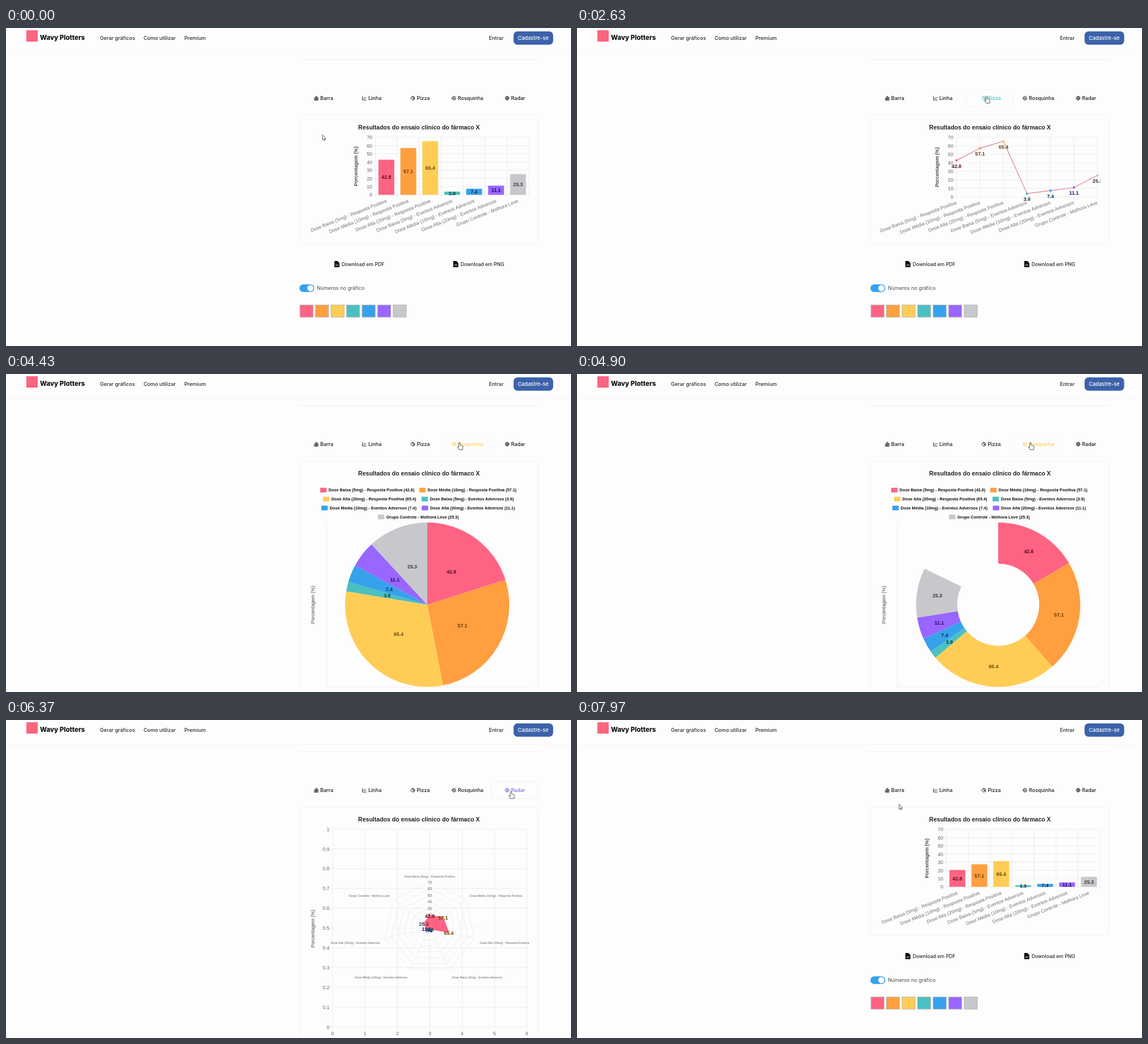
An HTML page that plays this animation: 998x561 px, repeating every 8000 ms.

```html
<!DOCTYPE html>
<html lang="pt-BR">
<head>
<meta charset="utf-8">
<title>Gráficos</title>
<style>
html, body { margin: 0; width: 100%; height: 100%; overflow: hidden; background: #fdfdfd; }
svg { display: block; width: 100%; height: 100%; }
text { white-space: pre; }
.ui { font-family: Inter, sans-serif; }
.chart { font-family: "Liberation Sans", Arial, sans-serif; }
</style>
</head>
<body>
<svg viewBox="0 0 998 561">
  <defs><clipPath id="edge"><rect x="518" y="150" width="406.5" height="411"/></clipPath></defs>
  <g id="page"></g>
  <g id="tabs"></g>
  <g id="plot"></g>
  <g id="cursor"></g>
</svg>
<script>
const LOOP = 8000;
const GROW = 1000;
const TITLE = "Resultados do ensaio clínico do fármaco X";
const AXIS = "Porcentagem (%)";
const NAMES = [
  "Dose Baixa (5mg) - Resposta Positiva", "Dose Média (10mg) - Resposta Positiva",
  "Dose Alta (20mg) - Resposta Positiva", "Dose Baixa (5mg) - Eventos Adversos",
  "Dose Média (10mg) - Eventos Adversos", "Dose Alta (20mg) - Eventos Adversos",
  "Grupo Controle - Melhora Leve"
];
const VALUES = [42.8, 57.1, 65.4, 3.9, 7.4, 11.1, 25.3];
const TOTAL = VALUES.reduce((a, b) => a + b);
const COLORS = ["#ff6384", "#ff9f40", "#ffcd56", "#4bc0c0", "#36a2eb", "#9966ff", "#c7c8cc"];
const DARK = ["#5c0a1c", "#6b3a05", "#6a4a08", "#0d3d3d", "#0c2a5c", "#200a5c", "#3c3c3c"];
const GRID = "#ebebf2";
const TAU = Math.PI * 2;

const el = id => document.getElementById(id);
const range = (n, f) => Array.from({ length: n }, (_, i) => f(i)).join("");

// y is the vertical middle of the text
function text(x, y, str, size, { cls = "chart", fill = "#666", weight = 400, anchor = "start", turn = 0 } = {}) {
  const spin = turn ? ` transform="rotate(${turn} ${x} ${y})"` : "";
  return `<text class="${cls}" x="${x}" y="${y + size * 0.36}" font-size="${size}" font-weight="${weight}" fill="${fill}" text-anchor="${anchor}"${spin}>${str}</text>`;
}
const ui = (x, y, str, size = 9, weight = 500, fill = "#2a2a2c") =>
  text(x, y, str, size, { cls: "ui", weight, fill });
const rect = (x, y, w, h, fill, extra = "") =>
  `<rect x="${x}" y="${y}" width="${w}" height="${h}" fill="${fill}" ${extra}/>`;
const line = (x1, y1, x2, y2, color = GRID, extra = "") =>
  `<path d="M${x1} ${y1}L${x2} ${y2}" stroke="${color}" stroke-width=".9" fill="none" ${extra}/>`;
const dot = (x, y, r, fill) => `<circle cx="${x}" cy="${y}" r="${r}" fill="${fill}"/>`;
const valueLabel = (x, y, i) =>
  text(x, y, VALUES[i], 8.8, { fill: DARK[i], weight: 700, anchor: "middle" });
const axisName = (x, y, weight) =>
  text(x, y, AXIS, 8.6, { fill: "#4a4a4a", weight, anchor: "middle", turn: -90 });

function drawPage() {
  const file = x => `<path d="M${x} 411h5.5l3.5 3.5v7.5h-9z" fill="#111"/>` + rect(x + 1.8, 417, 5.4, 2.4, "#777");
  el("page").innerHTML =
    rect(0, 0, 998, 561, "#fdfdfd") +
    line(0, 43.5, 998, 43.5, "#f5f5f2") +
    line(518, 55.5, 940, 55.5, "#ececea") +
    rect(36, 4, 20, 20, "#fb6580") +
    ui(60, 17, "Wavy Plotters", 11.5, 800, "#111") +
    ui(166, 17.5, "Gerar gráficos") + ui(243, 17.5, "Como utilizar") + ui(315, 17.5, "Premium") +
    ui(853, 17.5, "Entrar") +
    rect(896.5, 6, 70, 23.6, "#3c62a9", 'rx="7"') +
    ui(904, 17.5, "Cadastre-se", 9.2, 500, "#fff") +
    `<g id="tools">` +
    file(580) + ui(593, 416.5, "Download em PDF", 8.6) +
    file(790) + ui(803, 416.5, "Download em PNG", 8.6) +
    rect(518.2, 452.2, 26.4, 13.6, "#36a2eb", 'rx="6.8"') + dot(537.6, 459, 5.4, "#fff") +
    ui(549, 459, "Números no gráfico", 9, 400, "#4a4a4a") +
    range(7, i => rect(519.2 + i * 27.45, 488.7, 23.2, 21.4, COLORS[i], 'stroke="#bab6b4"')) +
    `</g>`;
}

// Tabs: label, text x, icon path, hover colour
const TABS = [
  ["Barra", 555, "M0 7.5h7.5M.6 7V3.6h2V7M2.8 7V.8h2V7M5 7V2.8h2V7", COLORS[0]],
  ["Linha", 640, "M.5 .5v6.8h7M2 5.2l1.8-1.9 1.2 1L7.2 2", COLORS[4]],
  ["Pizza", 725.5, "M4 .7a3.3 3.3 0 1 0 .01 0M4 .7V4l2.3 2.4M4 4h3.2", COLORS[3]],
  ["Rosquinha", 798, "M4 .7a3.3 3.3 0 1 0 .01 0M4 2.6a1.4 1.4 0 1 0 .01 0M5 5l1.3 1.3M2.7 4H.8", COLORS[2]],
  ["Radar", 892, "M4 .7a3.3 3.3 0 1 0 .01 0M4 .7v6.6M4 2.2a1.8 1.8 0 0 0 0 3.6M5 2.4h1.6M5 4h2M5 5.6h1.6", "#8a6fdc"]
];
const TAB_W = 84.4;

function tabAt(x, y) {
  return y > 108 && y < 139 && x > 518 && x < 940 ? Math.floor((x - 518) / TAB_W) : -1;
}

function drawTabs(hover) {
  el("tabs").innerHTML = TABS.map(([name, x, icon, color], i) => {
    const on = i === hover, ink = on ? color : "#1a1a1a";
    const frame = on ? rect(519.5 + i * TAB_W, 108.5, TAB_W - 2, 30, "#fdfdfd", `rx="5" stroke="${color}" stroke-opacity=".1"`) : "";
    return frame + `<path transform="translate(${x - 10.8} 119.8)" d="${icon}" fill="none" stroke="${ink}" stroke-width=".95"/>` +
      ui(x, 123.5, name, 9, 550, ink);
  }).join("");
}

function card(height) {
  return rect(518.5, 153.5, 421.5, height, "#fdfdfd", 'rx="5" stroke="#f1f1f0"') +
    text(729.5, 175.7, TITLE, 10.54, { fill: "#222", weight: 700, anchor: "middle" });
}

// Shared value axis, grid and slanted category names
function frame({ left, step, cols, top, base, first, tilt, nameY }) {
  const right = left + step * (cols - 1);
  const unit = (base - top) / 7;
  return range(8, k => {
    const y = base - k * unit;
    return line(left - 4, y, right, y) + text(left - 5.5, y, k * 10, 8.8, { anchor: "end" });
  }) +
  range(cols, i => line(left + i * step, top, left + i * step, base + 4)) +
  NAMES.map((name, i) => {
    const x = first + i * step;
    return `<text class="chart" font-size="8.5" fill="#707070" text-anchor="end" transform="translate(${x} ${nameY}) rotate(${-tilt})">${name}</text>`;
  }).join("");
}

function barChart(p) {
  const left = 652.5, step = 38.75, base = 294.3, top = 193;
  return card(226.5) + axisName(618.2, 244, 700) +
    frame({ left, step, cols: 8, top, base, first: 673, tilt: 21.5, nameY: 307.3 }) +
    VALUES.map((v, i) => {
      const h = v * p * (base - top) / 70, x = left + step * (i + 0.5);
      return rect(x - 14, base - h, 28, h, COLORS[i]) + valueLabel(x, base - h / 2, i);
    }).join("");
}

function lineChart(p) {
  const left = 670.3, step = 41.5, base = 298, top = 192.7;
  const pts = VALUES.map((v, i) => [left + step * i, base - v * p * (base - top) / 70]);
  return card(227) + axisName(636, 245.5, 700) +
    frame({ left, step, cols: 7, top, base, first: 671, tilt: 20.6, nameY: 310.3 }) +
    `<g clip-path="url(#edge)"><path d="M${pts.join("L")}" fill="none" stroke="#e0788f" stroke-width="1.15"/>` +
    pts.map(([x, y], i) => dot(x, y, 2.2, COLORS[i])).join("") +
    pts.map(([x, y], i) => valueLabel(x, y + 10, i)).join("") + `</g>`;
}

// Legend: swatch x, row
const LEGEND = [[555, 0], [730, 0], [560, 1], [734, 1], [557, 2], [734.5, 2], [657, 3]];

function roundChart(p, inner) {
  const cx = 744, cy = 407, R = 145;
  const at = (a, r) => `${cx + Math.sin(a) * r} ${cy - Math.cos(a) * r}`;
  const mid = (R + inner) / 2;
  let a = 0, slices = "", labels = "";
  VALUES.forEach((v, i) => {
    const b = a + v / TOTAL * TAU * p, m = (a + b) / 2;
    slices += `<path d="M${at(a, inner)}L${at(a, R)}A${R} ${R} 0 0 1 ${at(b, R)}L${at(b, inner)}` +
      `A${inner} ${inner} 0 0 0 ${at(a, inner)}Z" fill="${COLORS[i]}"/>`;
    labels += valueLabel(cx + Math.sin(m) * mid, cy - Math.cos(m) * mid, i);
    a = b;
  });
  const legend = LEGEND.map(([x, row], i) => {
    const y = 204.7 + row * 15.8;
    return rect(x, y - 4, 11.2, 8.2, COLORS[i]) +
      text(x + 14.7, y, `${NAMES[i]} (${VALUES[i]})`, 7.3, { fill: "#111", weight: 700 });
  }).join("");
  return card(450) + legend + axisName(541.5, 407, 400) +
    line(566, 262, 566, 552, "#dedef2", 'stroke-dasharray="2 1"') +
    line(566, 552, 922, 552, "#dedef2", 'stroke-dasharray="2 1"') + slices + labels;
}

// Radar captions: x, y, anchor
const CAPTIONS = [
  [748.5, 276, "middle"], [819, 310, "start"], [837, 393, "start"], [788, 454, "start"],
  [709, 454, "end"], [661, 393, "end"], [678, 310, "end"]
];

function radarChart(p) {
  const cx = 748.5, cy = 367, R = 81, left = 577, top = 192.5, dx = 57.2, dy = 34.9;
  const spoke = (i, r) => [cx + Math.sin(i * TAU / 7) * r, cy - Math.cos(i * TAU / 7) * r];
  const poly = f => "M" + VALUES.map((v, i) => spoke(i, f(v))).join("L") + "Z";
  const pts = VALUES.map((v, i) => spoke(i, v * p * R / 70));
  return card(450) + axisName(541.5, 368, 400) +
    range(11, k => {
      const y = top + k * dy;
      return line(left - 4, y, 920, y) + text(571.5, y, (10 - k) / 10, 8.8, { anchor: "end" });
    }) +
    range(7, k => {
      const x = left + k * dx;
      return line(x, top, x, top + 10 * dy + 4) + text(x, 552.5, k, 8.8, { anchor: "middle" });
    }) +
    range(7, k => `<path d="${poly(() => R * (k + 1) / 7)}" fill="none" stroke="${GRID}" stroke-width=".9"/>`) +
    range(7, i => line(cx, cy, ...spoke(i, R))) +
    range(7, k => {
      const y = cy - R * (k + 1) / 7;
      return rect(cx - 5, y - 4, 10, 8, "#fdfdfd", 'opacity=".75"') +
        text(cx, y, (k + 1) * 10, 7, { anchor: "middle" });
    }) +
    CAPTIONS.map(([x, y, anchor], i) => text(x, y, NAMES[i], 5.27, { anchor })).join("") +
    `<path d="${poly(v => v * p * R / 70)}" fill="#ff6384" stroke="#f4587a"/>` +
    pts.map(([x, y], i) => dot(x, y, 1.8, COLORS[i])).join("") +
    pts.map(([x, y], i) => valueLabel(x, y + 1, i)).join("");
}

// Start time, painter, whether the card leaves room for the tools
const SCENES = [
  [-GROW, barChart, true],
  [1425, lineChart, true],
  [2900, p => roundChart(p, 0), false],
  [4550, p => roundChart(p, 72.5), false],
  [6230, radarChart, false],
  [7820, barChart, true]
];

// Pointer rests: from, until, x, y
const RESTS = [
  [0, 300, 559, 188.5], [1100, 1700, 637.5, 128], [2400, 3450, 723.5, 120],
  [4120, 5030, 801, 121], [5280, 5600, 811.5, 121], [6100, 6800, 892, 126],
  [7550, 7835, 565, 128], [7950, LOOP, 569, 148.5]
];

function pointer(t) {
  const i = RESTS.findLastIndex(r => r[0] <= t);
  const [, leave, x, y] = RESTS[i];
  if (t <= leave) return [x, y];
  const [arrive, , nx, ny] = RESTS[i + 1];
  const k = (t - leave) / (arrive - leave), e = k * k * (3 - 2 * k);
  return [x + (nx - x) * e, y + (ny - y) * e];
}

const ARROW = "M0 0V9L2 7.2 3.4 10.2 4.7 9.6 3.4 6.8H6Z";
const HAND = "M-1.2 1Q0-.8 1.2 1V4.6L4.6 5.4Q6.3 5.8 6.2 7.4L5.4 12.6H-.8L-3.4 8.6Q-3.9 7-2.4 7.2L-1.2 8.3Z";

function render(t) {
  const [start, paint, tools] = SCENES.findLast(s => s[0] <= t);
  const left = 1 - Math.min(1, (t - start) / GROW);
  el("plot").innerHTML = paint(1 - left ** 4);
  el("tools").style.display = tools ? "" : "none";

  const [x, y] = pointer(t);
  const hover = tabAt(x, y);
  drawTabs(hover);
  el("cursor").innerHTML = `<path transform="translate(${x} ${y})" d="${hover < 0 ? ARROW : HAND}" fill="#fff" stroke="#444" stroke-width=".9" stroke-linejoin="round"/>`;
}

drawPage();
const begin = performance.now();
function tick() {
  render((performance.now() - begin) % LOOP);
  requestAnimationFrame(tick);
}
tick();
</script>
</body>
</html>
```
